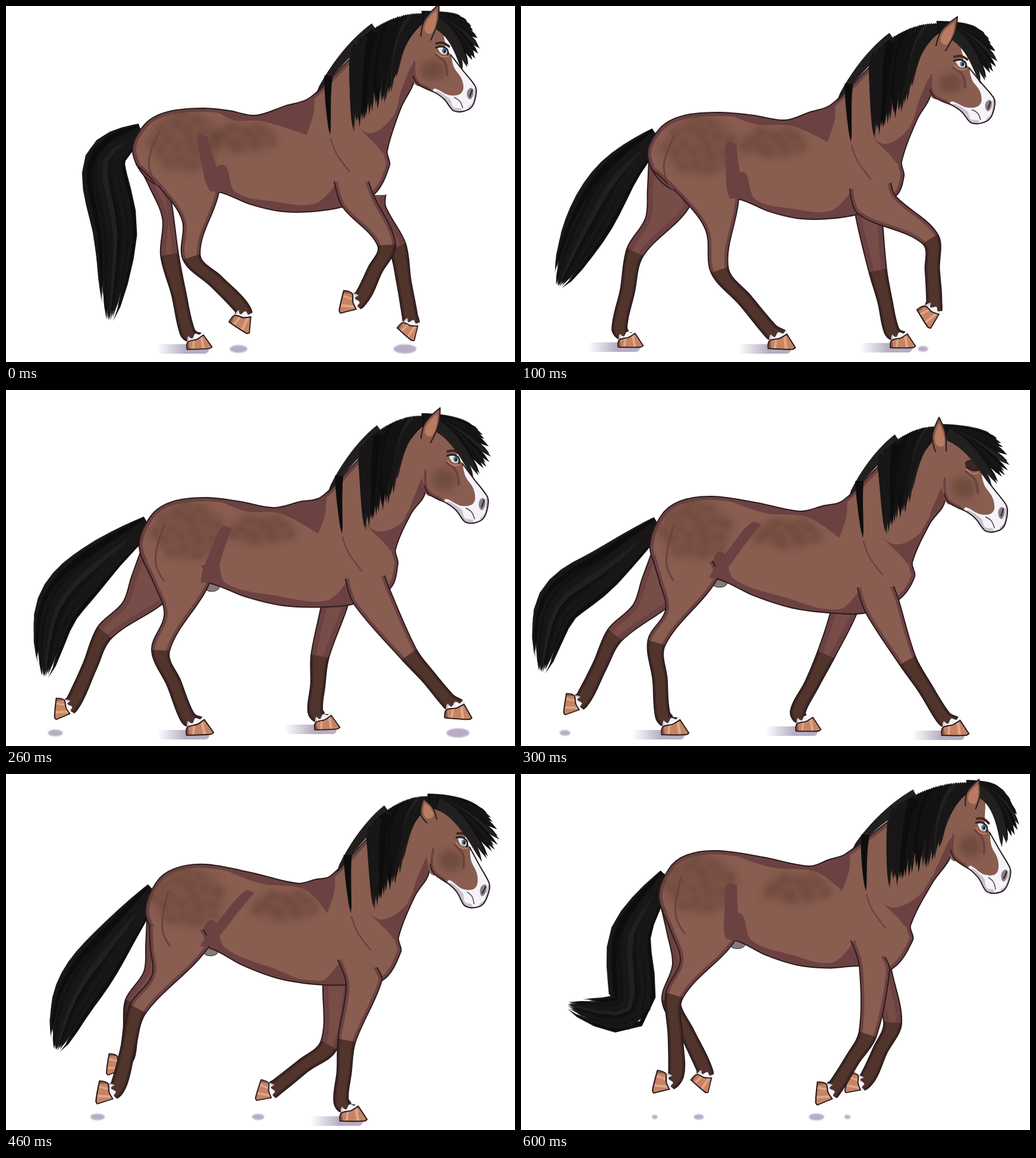
An HTML page that plays this animation: 856 px wide and 599 px high, repeating every 0.7 s.

```html
<!DOCTYPE html>
<html lang="en">
<head>
<meta charset="utf-8">
<title>Cantering horse</title>
<style>
html, body { margin: 0; width: 100%; height: 100%; overflow: hidden; background: #fff; }
#strip { display: flex; width: 5992px; height: 599px; animation: run 700ms steps(7) infinite; }
#strip svg { flex: none; width: 856px; height: 599px; overflow: hidden; }
@keyframes run { to { transform: translateX(-5992px); } }
</style>
</head>
<body>
<svg width="0" height="0" style="position:absolute"><defs>
<filter id="soft" x="-50%" y="-50%" width="200%" height="200%"><feGaussianBlur stdDeviation="6"/></filter>
<filter id="blur" x="-50%" y="-50%" width="200%" height="200%"><feGaussianBlur stdDeviation="1.2"/></filter>
<linearGradient id="fade"><stop offset="0" stop-color="#b7adc4" stop-opacity="0"/><stop offset=".55" stop-color="#b7adc4"/></linearGradient>
</defs></svg>
<div id="strip"></div>
<script>
const COAT = '#895d50', SHADE = '#6c4142', FAR = '#784c47', DARK = '#51342b', DEEP = '#3f2824',
  LINE = '#2a1b1c', WHITE = '#f5f3f7', LILAC = '#c8c1d4', HAIR = ['#131212', '#181616', '#0e0d0d', '#221f1f'];

const strip = document.getElementById('strip');
const rand = seed => { const v = Math.sin(seed * 12.9898) * 43758.5453; return v - Math.floor(v); };

// Points are [x, y, sharp]; in text "!" marks a sharp corner.
const rows = text => text.split(',').map(s => s.match(/-?[\d.]+/g).map(Number));
const parse = text => text.split(',').map((s, i) => [...rows(text)[i], s.includes('!')]);
const add = (p, x, y, sharp) => [p[0] + x, p[1] + y, sharp];
const mix = (p, q, t) => [p[0] + (q[0] - p[0]) * t, p[1] + (q[1] - p[1]) * t];
const unit = (p, q) => { const x = q[0] - p[0], y = q[1] - p[1], l = Math.hypot(x, y) || 1; return [x / l, y / l]; };
const bend = (a, c, b, t) => mix(mix(a, c, t), mix(c, b, t), t);

function curve(pts, closed = true, from = 0, to = closed ? pts.length : pts.length - 1) {
  const n = pts.length, at = i => pts[(i + n) % n];
  const dir = i => at(i)[2] || (!closed && (i === 0 || i === n - 1)) ? [0, 0] : unit(at(i - 1), at(i + 1));
  let d = `M${at(from)[0]} ${at(from)[1]}`;
  for (let i = from; i < to; i++) {
    const p = at(i), q = at(i + 1), u = dir(i), v = dir(i + 1), k = Math.hypot(q[0] - p[0], q[1] - p[1]) / 3;
    d += 'C' + [add(p, u[0] * k, u[1] * k), add(q, -v[0] * k, -v[1] * k), q]
      .map(c => c[0].toFixed(1) + ' ' + c[1].toFixed(1));
  }
  return d;
}

// A point on the smooth line through pts, t from 0 to 1.
function along(pts, t) {
  const n = pts.length - 1, i = Math.min(n - 1, Math.floor(t * n)), f = t * n - i;
  const [a, b, c, d] = [-1, 0, 1, 2].map(k => pts[Math.max(0, Math.min(n, i + k))]);
  return [0, 1].map(k => b[k] + f / 2 * (c[k] - a[k]
    + f * (2 * a[k] - 5 * b[k] + 4 * c[k] - d[k] + f * (3 * (b[k] - c[k]) + d[k] - a[k]))));
}

const fill = (d, color, more = '') => `<path d="${d}" fill="${color}" ${more}/>`;
const line = (d, color = LINE, width = 2) =>
  `<path d="${d}" fill="none" stroke="${color}" stroke-width="${width}" stroke-linecap="round" stroke-linejoin="round"/>`;
const shape = (text, color, more) => fill(curve(parse(text)), color, more);
const stroke = (text, color, width) => line(curve(parse(text), false), color, width);
const oval = (x, y, rx, ry, color, more = '') =>
  `<ellipse cx="${x}" cy="${y}" rx="${rx}" ry="${ry}" fill="${color}" ${more}/>`;

let clips = 0;
function clipped(d, content) {
  const id = 'clip' + clips++;
  return `<clipPath id="${id}"><path d="${d}"/></clipPath><g clip-path="url(#${id})">${content}</g>`;
}

// One tapering lock of hair along the path at(t).
function lock(at, half, seed) {
  const left = [], right = [];
  for (let i = 0; i <= 12; i++) {
    const t = i / 12, p = at(t), u = unit(p, at(t + .02)), w = half * Math.sqrt(1 - t);
    left.push([p[0] - u[1] * w, p[1] + u[0] * w]);
    right.unshift([p[0] + u[1] * w, p[1] - u[0] * w]);
  }
  return fill('M' + [...left, ...right].join('L') + 'Z', HAIR[Math.floor(rand(seed) * 4)]);
}
const locks = (count, make) => Array.from({ length: count }, (_, i) => make(i / (count - 1), i)).join('');

function tail(root, keys) {
  const spine = [root, ...keys];
  return locks(34, (s, i) => {
    const o = 2 * (i * 13 % 34) / 33 - 1, end = 1 - .22 * rand(i) * Math.abs(o);
    return lock(t => {
      const p = along(spine, t * end), u = unit(p, along(spine, t * end + .02));
      const w = o * (7 + 29 * Math.sin(Math.PI * (t * end) ** 1.15));
      return [p[0] - u[1] * w, p[1] + u[0] * w];
    }, 6.5, i);
  });
}

const crestOf = (poll, withers) => {
  const end = add(withers, 11, -6), ctrl = add(mix(poll, end, .51), 0, (poll[1] - end[1]) * .51 - 3);
  return t => bend(poll, ctrl, end, t);
};

function mane(poll, crest) {
  const end = crest(1), hang = (a, b, half, seed) =>
    lock(t => bend(a, [b[0] - 5 + (a[0] - b[0]) * .3, a[1] + 26], b, t), half, seed);
  return lock(t => crest(.45 + .55 * t), 11, 1) + hang(crest(.88), add(end, 24, 68), 7, 3)
    + locks(36, (s, i) => {
      const v = (i * 11 % 36) / 35, tip = mix(add(poll, -48, 118), add(end, 60, 66), v);
      return hang(add(crest(v * .64), 0, 6), add(tip, 8 * rand(i) - 4, 34 * rand(i + 9) - 26), 8, i);
    });
}

function forelock(poll, eye) {
  return locks(18, (s, i) => {
    const root = add(poll, 18 * s - 6, 6 + 8 * s);
    const tip = add(eye, 30 + 27 * Math.sin(Math.PI * s) + 6 * rand(i), 88 * s - 60 + 8 * rand(i + 5));
    return lock(t => bend(root, add(poll, 50, 4 + 24 * s), tip, t), 10, i + 20);
  });
}

function ear(base, tip) {
  const [x, y] = unit(base, tip);
  const leaf = k => [[-9, 0], [-13, .45], [0, 1], [9, .55], [9, 0]].map(([w, t]) => {
    const p = mix(base, tip, .5 + (t - .5) * k);
    return add(p, -y * w * k, x * w * k, t === 1);
  });
  return fill(curve(leaf(1)), COAT) + fill(curve(leaf(.65)), '#b97b5f') + line(curve(leaf(1), false));
}

// Hoof space: the sole's middle is 0 0 and the toe points right. Lifted hooves look shorter and deeper.
function hoofSpace([x, y, angle], size) {
  const lifted = Math.abs(angle) > 20, sx = size * (lifted ? .85 : 1), sy = size * (lifted ? 1.08 : 1);
  const r = angle * Math.PI / 180, cos = Math.cos(r), sin = Math.sin(r);
  return {
    at: (u, v) => [x + u * sx * cos - v * sy * sin, y + u * sx * sin + v * sy * cos],
    wrap: content => `<g transform="translate(${x} ${y}) rotate(${angle}) scale(${sx} ${sy})">${content}</g>`
  };
}

function hoof() {
  const horn = curve(parse('-24 0!,-22 -14,-4 -19,9 -27!,25 -3!,20 0'));
  return shape('-22 -13!,-21 -24,-13 -21,-7 -30,2 -28,8 -34,11 -25,-3 -17', WHITE)
    + stroke('-21 -15,-20 -24', LILAC, 3) + fill(horn, '#c68464')
    + clipped(horn, stroke('-10 -18,-12 2', '#dfa888', 4) + stroke('5 -22,9 2', '#dfa888', 5) + stroke('-24 -14,-22 0', '#8e5648', 7))
    + line(horn + 'Z', LINE, 2.2);
}

// back and front list the edges from the body down to the joint.
function leg(back, front, [jx, jy, ...foot], far) {
  const size = far ? .86 : .93, space = hoofSpace(foot, size), joint = [jx, jy], fetlock = space.at(-21, -33);
  const top = mix(back[back.length - 1], front[front.length - 1], .5);
  const up = unit(top, joint), down = unit(joint, fetlock), turn = unit([0, 0], [up[0] + down[0], up[1] + down[1]]);
  const side = (p, d, w) => add(p, -d[1] * w, d[0] * w), mid = mix(joint, fetlock, .5);
  const low = [side(joint, turn, 15), side(mid, down, 12), side(fetlock, down, 13), space.at(-21, -16),
    space.at(9, -27), side(fetlock, down, -12), side(mid, down, -12), side(joint, turn, -15)];
  const pts = [...back, ...low, ...[...front].reverse()], n = back.length;
  const all = curve(pts, false), dark = curve(pts, false, n, n + 7) + 'Z';
  return space.wrap(shape('-12 -14!,-28 -21!,-24 -26!,-31 -36!,-25 -36!,-24 -46!,-4 -34', DEEP))
    + fill(all + 'Z', far ? FAR : COAT)
    + clipped(all + 'Z', line(all, SHADE, far ? 18 : 11) + fill(dark, DARK))
    + clipped(dark, line(all, DEEP, 8)) + line(all) + space.wrap(hoof());
}

function hind(rump, flank, row, far) {
  const start = add(rump, far ? 2 : 6, far ? 8 : 22), joint = [row[0] - 14, row[1]];
  const root = far ? add(mix(rump, flank, .45), 0, 55) : flank;
  const back = [start, add(mix(rump, joint, .35), far ? 12 : 17, 0), add(mix(rump, joint, .65), far ? 19 : 28, 0)];
  return leg(back, [add(root, -8, -30), root], row, far);
}

function fore(elbow, low, row, far) {
  if (!far) return leg([add(elbow, -14, -42), elbow], [add(low, -8, -22), low], row);
  const root = add(elbow, (row[0] - elbow[0]) * .55, -6);
  return leg([add(root, -22, -14), add(root, -23, 6)], [add(root, 22, -14), add(root, 22, 6)], row, true);
}

function shadow([, , x, y, angle]) {
  if (Math.abs(angle) < 20 && y > 565)
    return `<rect x="${x - 72}" y="${y - 8}" width="88" height="16" rx="7" fill="url(#fade)"/>`;
  const r = (y - 505) * .4;
  return r > 0 ? oval(x, 577, r, 2 + r * .3, '#b7adc4', 'filter="url(#blur)"') : '';
}

function dapples([x, y], rx, ry, count, seed) {
  let out = oval(x, y, rx, ry, '#6a4639', 'opacity=".38"');
  for (let i = 0; i < count; i++) {
    const a = i * 2.4, r = Math.sqrt((i + .5) / count);
    out += oval(x + Math.cos(a) * r * rx, y + Math.sin(a) * r * ry,
      7 + 6 * rand(seed + i), 6 + 4 * rand(seed + i + 50), '#5c3e33', 'opacity=".4"');
  }
  return `<g filter="url(#soft)">${out}</g>`;
}

// The head is drawn once, then fitted to the eye, nose and jaw of each pose.
function head(eye, nose, jaw, shut) {
  const ux = 55, uy = 62, vx = -38, vy = 58, det = ux * vy - vx * uy;
  const col = k => {
    const n = nose[k] - eye[k], j = jaw[k] - eye[k];
    return [(n * vy - j * uy) / det, (j * ux - n * vx) / det];
  };
  const [a, c] = col(0), [b, d] = col(1);
  const edge = parse('712 40,732 60,748 82,768 108,788 133,791 143,787 163,781 172,770 177,760 178,751 175,737 157,722 146,706 139,692 131,685 118,685 95,694 58');
  const face = curve(edge);
  const lid = shut
    ? shape('722 70,732 63,746 68,750 76,736 79', '#3b2623') + stroke('724 75,736 80,749 78', LINE, 2.5)
    : shape('726 71!,735 70,742 75,740 81,732 80', '#e4ebee') + oval(737, 75.5, 3.8, 4.8, '#557f9c')
      + oval(738, 76, 1.8, 2.8, '#14202a') + stroke('723 70,732 68,742 73,743 82', LINE, 2.6)
      + stroke('724 63,735 62,745 68', DEEP, 4);
  const marks = oval(718, 108, 20, 17, '#684637', 'filter="url(#soft)" opacity=".75"')
    + stroke('684 95,685 118,692 131,710 141', SHADE, 9) + stroke('723 82,738 95,742 116', SHADE, 4)
    + shape('752 84,753 102,766 122,769 140,762 149,745 150,718 142,740 182,795 185,800 130', WHITE)
    + shape('722 146,746 156,752 170,766 175,750 182', LILAC) + stroke('789 140,787 162,779 171', LILAC, 4)
    + shape('776 143,783 138,786 147,781 157,776 153', '#8b8189') + stroke('784 141,780 152', '#353034', 2.5)
    + stroke('754 154,763 160,768 171', '#564c53', 1.6);
  return `<g transform="matrix(${[a, b, c, d, ...eye]}) translate(-735 -76)">` + fill(face, COAT) + clipped(face, marks)
    + stroke('724 78,733 85,744 84', '#c77f56', 2) + lid + line(curve(edge, false, 2, 15)) + '</g>';
}

function pose(step, p) {
  const [rump, croup, dip, withers, breast, low, elbow, flank] = rows(p.torso);
  const [eye, nose, jaw, poll, earTip] = rows(p.head), legs = rows(p.legs);
  const [nearHind, farHind, nearFore, farFore] = legs;
  const crest = crestOf(poll, withers), throat = add(jaw, -11, -6), neck = add(mix(throat, breast, .37), -5, 0);
  const onRump = (x, y) => [rump[0] + (croup[0] - rump[0]) * x, rump[1] + (croup[1] - rump[1]) * y];
  const belly = t => add(mix(elbow, flank, t), 0, 20 * Math.sin(Math.PI * t));

  const body = curve([rump, onRump(.17, .62), onRump(.48, .91), croup, add(mix(croup, dip, .5), 0, -2), dip,
    mix(dip, withers, .55), withers, ...[.75, .5, .25].map(t => add(crest(t), 5, 8)), add(poll, 0, 18), throat, neck,
    breast, add(breast, 4, 24), low, elbow, belly(.25), belly(.5), belly(.75), flank,
    add(flank, -50, 0), add(rump, 30, 50)]);
  const skull = curve([add(poll, -12, 14), add(poll, 20, 16), add(eye, 4, -12), eye, jaw, throat]);

  const shades = [
    [add(croup, 0, -8), add(croup, 25, 6), add(mix(croup, dip, .6), 0, 13), add(dip, 12, 10), add(withers, -5, 62, true),
      add(withers, 8, 20), add(withers, 0, -12), add(dip, 0, -20)],
    [add(flank, 5, -46), add(flank, 28, 0), add(belly(.55), 0, -15), add(elbow, -45, -6), add(elbow, -8, -44, true),
      add(elbow, 4, 0), add(belly(.5), 0, 20), flank],
    [add(throat, 5, -30), add(throat, -20, 10), add(neck, -12, 12), add(breast, -28, -30), add(breast, -62, -54, true),
      add(breast, -20, -12), add(breast, 0, 4), add(neck, 15, 0)]
  ].map(pts => fill(curve(pts), SHADE)).join('');

  // The fold at the flank sways once per stride.
  const sway = 15 + 50 * Math.cos(2 * Math.PI * (step - 3.6) / 7), fold = add(flank, sway, -95);
  const creases = fill(curve([add(flank, -14, 0), add(mix(flank, fold, .6), -10, 0), fold, add(fold, 16, 3, true),
    add(mix(flank, fold, .65), 12, 0), add(flank, 6, -6)]), SHADE)
    + line(curve([onRump(.38, .45), add(rump, 28, 10), add(rump, 32, 40), add(rump, 62, 82)], false), SHADE, 3)
    + line(curve([add(withers, 36, 68), add(withers, 46, 94), add(withers, 68, 124)], false), SHADE, 2.5);
  const sheath = nearHind[0] < flank[0] - 60 ? oval(flank[0] + 4, flank[1] + 6, 13, 8, '#87797b', `stroke="${LINE}"`) : '';

  strip.insertAdjacentHTML('beforeend', '<svg viewBox="0 0 856 599">' + legs.map(shadow).join('')
    + tail(onRump(.13, .48), rows(p.tail)) + hind(rump, flank, farHind, true) + fore(elbow, low, farFore, true) + sheath
    + fill(body, COAT) + clipped(body, line(body, SHADE, 12) + shades) + line(body)
    + hind(rump, flank, nearHind) + fore(elbow, low, nearFore)
    + clipped(body, dapples(add(croup, -28, 56), 60, 52, 18, 3) + dapples(add(dip, -20, 38), 58, 26, 11, 9) + creases)
    + fill(skull, COAT) + head(eye, nose, jaw, p.shut) + mane(poll, crest) + forelock(poll, eye)
    + ear(add(poll, 1, 42), earTip) + '</svg>');
}

// torso: rump, croup, dip, withers, breast, chest floor, elbow, flank
// head: eye, nose, jaw, poll, ear tip
// legs: joint x y, hoof x y, hoof angle for near hind, far hind, near fore, far fore
[{
  torso: '213 245,330 172,420 184,510 155,641 244,618 318,566 338,358 313',
  head: '735 76,790 138,697 134,705 12,728 -3', tail: '166 262,183 385,173 530',
  legs: '312 422 391 542 33,275 418 325 577 -2,640 402 564 497 103,658 405 671 553 41'
}, {
  torso: '213 252,330 179,445 192,520 167,640 262,630 320,567 350,366 325',
  head: '740 98,796 158,700 156,705 29,734 18', tail: '160 285,105 380,62 472',
  legs: '334 444 438 577 2,192 414 184 574 0,688 392 676 527 58,600 445 642 575 0'
}, {
  torso: '224 265,335 181,450 198,530 180,655 268,645 335,585 360,342 325',
  head: '754 117,810 182,716 178,705 43,730 30', tail: '150 293,85 370,64 483',
  legs: '260 438 326 580 -2,166 408 83 536 95,678 445 760 553 4,528 448 540 571 -2'
}, {
  torso: '217 268,322 179,470 204,540 187,658 290,635 353,580 375,330 318',
  head: '760 131,817 197,724 192,705 61,703 46', tail: '140 300,60 365,34 475', shut: true,
  legs: '228 425 259 580 0,158 412 74 528 98,650 455 730 581 0,513 445 483 574 0'
}, {
  torso: '235 235,335 152,490 184,545 172,660 275,632 348,572 355,340 292',
  head: '768 115,813 187,723 170,715 37,702 42', tail: '173 290,115 375,84 465',
  legs: '222 395 154 535 100,215 385 171 488 98,573 448 584 584 0,543 456 424 531 107'
}, {
  torso: '243 225,348 136,490 166,552 150,663 258,618 345,566 337,362 283',
  head: '788 102,807 183,736 150,760 16,772 3', tail: '178 280,160 400,68 402',
  legs: '251 370 177 499 105,258 375 229 511 70,560 440 548 586 0,582 440 465 516 105'
}, {
  torso: '232 210,330 129,485 155,545 135,655 255,620 330,569 323,360 280',
  head: '776 90,823 162,733 146,755 14,770 9', tail: '184 270,180 395,78 388',
  legs: '258 372 225 517 104,252 380 299 526 41,583 438 497 537 95,625 418 549 518 107'
}].forEach((p, step) => pose(step, p));
</script>
</body>
</html>
```
